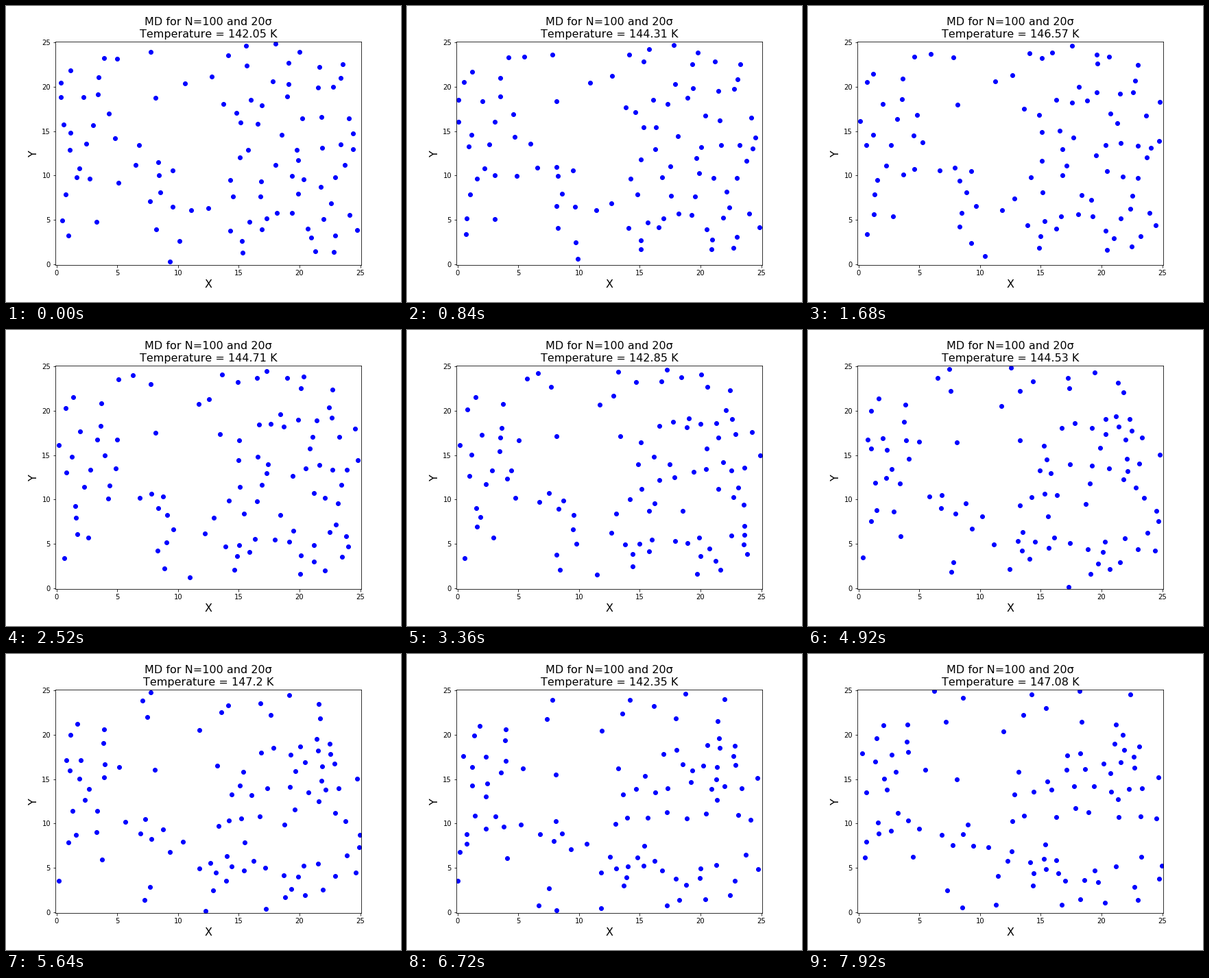
A matplotlib script for the animation above (8 s loop, 576 px wide and 432 px high).

```python
import numpy as np
import matplotlib.pyplot as plt
from matplotlib.animation import FuncAnimation

plt.rcParams["font.family"] = "DejaVu Sans"
plt.rcParams["text.kerning_factor"] = 6

COUNT = 100
BOX = 25.0           # side of the periodic cell, in sigma
MIN_GAP = 1.0        # closest allowed start distance
DT, SUBSTEPS = 0.005, 8
STEPS = 67
TICKS = 3            # drawn frames per simulation step
FRAMES = 200
KELVIN = 120.0       # one reduced temperature unit

# Empty patches at the start: x, y, radius
VOIDS = [(11, 15.5, 3.2), (6.5, 20.5, 2.3), (11.8, 23, 1.9), (3.5, 0.5, 3),
         (18, 2, 2.2), (12, 0, 2), (5.8, 5.8, 2)]

# Thermometer readings along the run
TEMP_STEPS = [0, 14, 28, 36, 47, 56, 66]
TEMPS = [142.05, 146.57, 142.85, 142.3, 147.2, 142.35, 147.08]


def nearest_image(delta):
    return delta - BOX * np.round(delta / BOX)


def scatter(rng):
    """Random start places that keep apart and stay out of the voids."""
    placed = []
    while len(placed) < COUNT:
        spot = rng.uniform(0.2, BOX - 0.1, 2)
        if any(np.hypot(spot[0] - x, spot[1] - y) < r for x, y, r in VOIDS):
            continue
        gaps = nearest_image(np.array(placed).reshape(-1, 2) - spot)
        if np.all(np.hypot(*gaps.T) > MIN_GAP):
            placed.append(spot)
    return np.array(placed)


def forces(pos):
    """Lennard-Jones force on every particle."""
    delta = nearest_image(pos[:, None] - pos[None])
    r2 = (delta ** 2).sum(axis=2)
    np.fill_diagonal(r2, np.inf)
    inv6 = r2 ** -3
    strength = 24 * (2 * inv6 ** 2 - inv6) / r2
    return (strength[..., None] * delta).sum(axis=1)


def simulate(seed):
    """Velocity Verlet run; returns the places at every step."""
    rng = np.random.default_rng(seed)
    pos = scatter(rng)
    vel = rng.normal(0, np.sqrt(TEMPS[0] / KELVIN), pos.shape)
    vel -= vel.mean(axis=0)
    acc = forces(pos)
    path = [pos]
    for _ in range(STEPS - 1):
        for _ in range(SUBSTEPS):
            vel = vel + 0.5 * DT * acc
            pos = (pos + DT * vel) % BOX
            acc = forces(pos)
            vel = vel + 0.5 * DT * acc
        path.append(pos)
    return path


def heading(step):
    temp = round(float(np.interp(step, TEMP_STEPS, TEMPS)), 2)
    return f"MD for N={COUNT} and 20σ\nTemperature = {temp} K"


path = simulate(seed=7)

fig, ax = plt.subplots(figsize=(8, 6), dpi=72)
fig.subplots_adjust(left=0.125, right=0.9, bottom=0.125, top=0.88)
ax.set_xlim(-0.1, BOX + 0.1)
ax.set_ylim(-0.1, BOX + 0.1)
ax.set_xlabel("X", fontsize=16)
ax.set_ylabel("Y", fontsize=16)
title = ax.set_title(heading(0), fontsize=16)
dots, = ax.plot(*path[0].T, "bo", markersize=6)


def update(frame):
    step = min(frame // TICKS, STEPS - 1)
    dots.set_data(*path[step].T)
    title.set_text(heading(step))
    return dots, title


anim = FuncAnimation(fig, update, frames=FRAMES, interval=40,
                     repeat=True, repeat_delay=0, blit=False)
plt.show()
```
